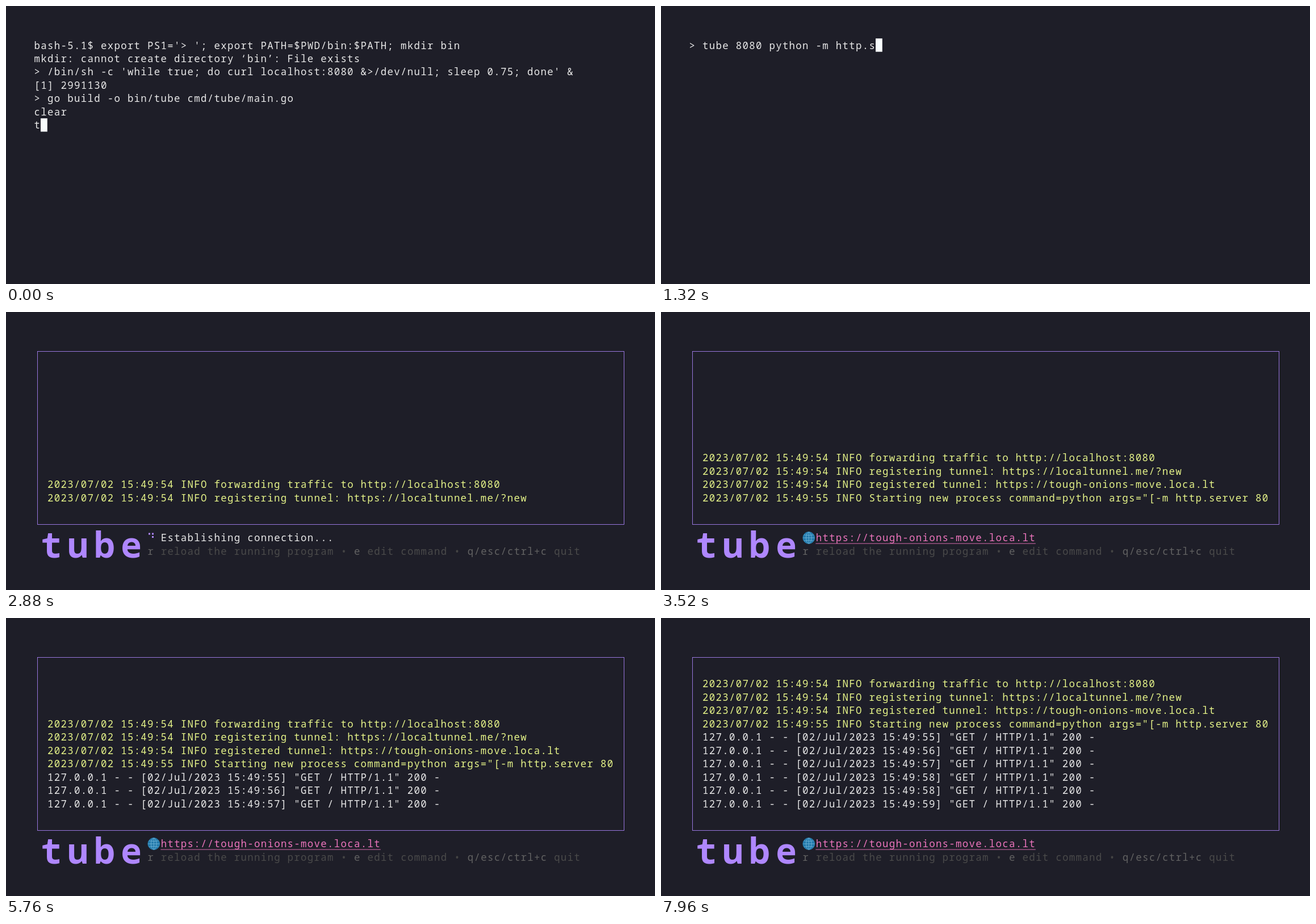
An HTML page that plays this animation: 1143x490 px, repeating every 8 s.

```html
<!DOCTYPE html>
<html lang="en">
<head>
<meta charset="utf-8">
<title>Terminal session</title>
<style>
  html, body { margin: 0; width: 100%; height: 100%; overflow: hidden; background: #1e1e28; }
  svg { display: block; }
  text { white-space: pre; font-family: 'Noto Sans Mono', monospace; font-kerning: none; font-variant-ligatures: none; }
</style>
</head>
<body>
<svg id="stage" width="1143" height="490" viewBox="0 0 1143 490"></svg>
<script>
const LOOP = 8000, TICK = 40;
const LEFT = 49.3, TOP = 57.4, CELL_W = 11.74, CELL_H = 23.47;
const FONT_SIZE = 17.4, ADVANCE = 0.6, BEARING = 0.3, BASELINE = 18.1;
const FG = '#e8e8e8', YELLOW = '#e5f388', PURPLE = '#af87ff', PINK = '#ec74bc';
const CURSOR = '#f8fcfd', KEY = '#626262', DESC = '#4a4a4a', DOT = '#444444';

const stage = document.getElementById('stage');

const x = col => LEFT + col * CELL_W;
const y = row => TOP + row * CELL_H;
const escape = s => s.replace(/&/g, '&amp;').replace(/</g, '&lt;').replace(/>/g, '&gt;');

const rect = (left, top, w, h, fill) =>
  `<rect x="${left}" y="${top}" width="${w}" height="${h}" fill="${fill}"/>`;

const text = (left, baseline, str, color, size, pitch, weight = 400) =>
  `<text x="${left}" y="${baseline}" fill="${color}" font-size="${size}" font-weight="${weight}"` +
  ` letter-spacing="${pitch - size * ADVANCE}">${escape(str)}</text>`;

const write = (row, col, str, color = FG) =>
  text(x(col) + BEARING, y(row) + BASELINE, str, color, FONT_SIZE, CELL_W);

const cursor = (row, col) => rect(x(col), y(row) - 0.2, CELL_W, CELL_H, CURSOR);

const HISTORY = [
  "bash-5.1$ export PS1='> '; export PATH=$PWD/bin:$PATH; mkdir bin",
  'mkdir: cannot create directory ‘bin’: File exists',
  "> /bin/sh -c 'while true; do curl localhost:8080 &>/dev/null; sleep 0.75; done' &",
  '[1] 2991130',
  '> go build -o bin/tube cmd/tube/main.go',
  'clear',
  't'
];
const COMMAND = '> tube 8080 python -m http.server 8080';
const CLEAR_AT = 40, APP_AT = 2880, LINK_AT = 3480;
const URL_TEXT = 'https://tough-onions-move.loca.lt';

const info = (at, second, message) =>
  ({ at, text: `2023/07/02 15:49:${second} INFO ${message}`, color: YELLOW });
const request = (at, second) =>
  ({ at, text: `127.0.0.1 - - [02/Jul/2023 15:49:${second}] "GET / HTTP/1.1" 200 -`, color: FG });

const LOG = [
  info(APP_AT, 54, 'forwarding traffic to http://localhost:8080'),
  info(APP_AT, 54, 'registering tunnel: https://localtunnel.me/?new'),
  info(3440, 54, `registered tunnel: ${URL_TEXT}`),
  info(3520, 55, 'Starting new process command=python args="[-m http.server 80'),
  request(4280, 55),
  request(5000, 56),
  request(5760, 57),
  request(6480, 58),
  request(7200, 58),
  request(7960, 59)
];
const HELP = [
  ['r', KEY], [' reload the running program', DESC], [' • ', DOT],
  ['e', KEY], [' edit command', DESC], [' • ', DOT],
  ['q/esc/ctrl+c', KEY], [' quit', DESC]
];

function shell(t) {
  if (t < CLEAR_AT) {
    return HISTORY.map((line, row) => write(row, 0, line)).join('') + cursor(6, 1);
  }
  const typed = Math.min(COMMAND.length, 19 + Math.floor((t - 832) / 52));
  return write(0, 0, COMMAND.slice(0, typed)) + cursor(0, typed);
}

function spinner(t) {
  const frames = '⠙⠹⠸⠼⠴⠦⠧⠇⠏⠋';
  const step = Math.floor((t - APP_AT) / (1000 / 12));
  const bits = frames.charCodeAt(step % frames.length) - 0x2800;
  let dots = '';
  for (let i = 0; i < 6; i++) {
    if (bits >> i & 1) {
      dots += rect(251 + 6 * Math.floor(i / 3), 389.5 + 5.5 * (i % 3), 3, 3, PURPLE);
    }
  }
  return dots;
}

function globe() {
  return `<g transform="translate(260.3 398)" fill="none" stroke="#6db0d4" stroke-width="0.9">
    <circle r="10.4" fill="#2279ab" stroke="#2a86b8"/>
    <ellipse rx="4.8" ry="10"/>
    <path d="M0-10V10M-10 0H10M-8.4-5.2Q0-3.6 8.4-5.2M-8.4 5.2Q0 3.6 8.4 5.2"/>
  </g>`;
}

function status(t) {
  if (t < LINK_AT) return spinner(t) + write(14, 19, 'Establishing connection...');
  return globe() + write(14, 19, URL_TEXT, PINK) +
    rect(x(19), 407.6, URL_TEXT.length * CELL_W, 0.9, PINK);
}

function help() {
  let col = 17;
  return HELP.map(([str, color]) => {
    const out = write(15, col, str, color);
    col += str.length;
    return out;
  }).join('');
}

function app(t) {
  const lines = LOG.filter(line => line.at <= t);
  const first = 12 - lines.length;
  return `<rect x="55.5" y="69.5" width="1033" height="305" fill="none" stroke="${PURPLE}" stroke-width="0.84"/>` +
    lines.map((line, i) => write(first + i, 2, line.text, line.color)).join('') +
    text(61, 432.5, 'tube', PURPLE, 62, 4 * CELL_W, 900) +
    status(t) + help();
}

let shown = -1;
function render(time) {
  const t = Math.floor(time % LOOP / TICK) * TICK;
  if (t !== shown) {
    shown = t;
    stage.innerHTML = rect(0, 0, 1143, 490, '#1e1e28') + (t < APP_AT ? shell(t) : app(t));
  }
}

function loop() {
  render(performance.now());
  requestAnimationFrame(loop);
}
loop();
</script>
</body>
</html>
```
